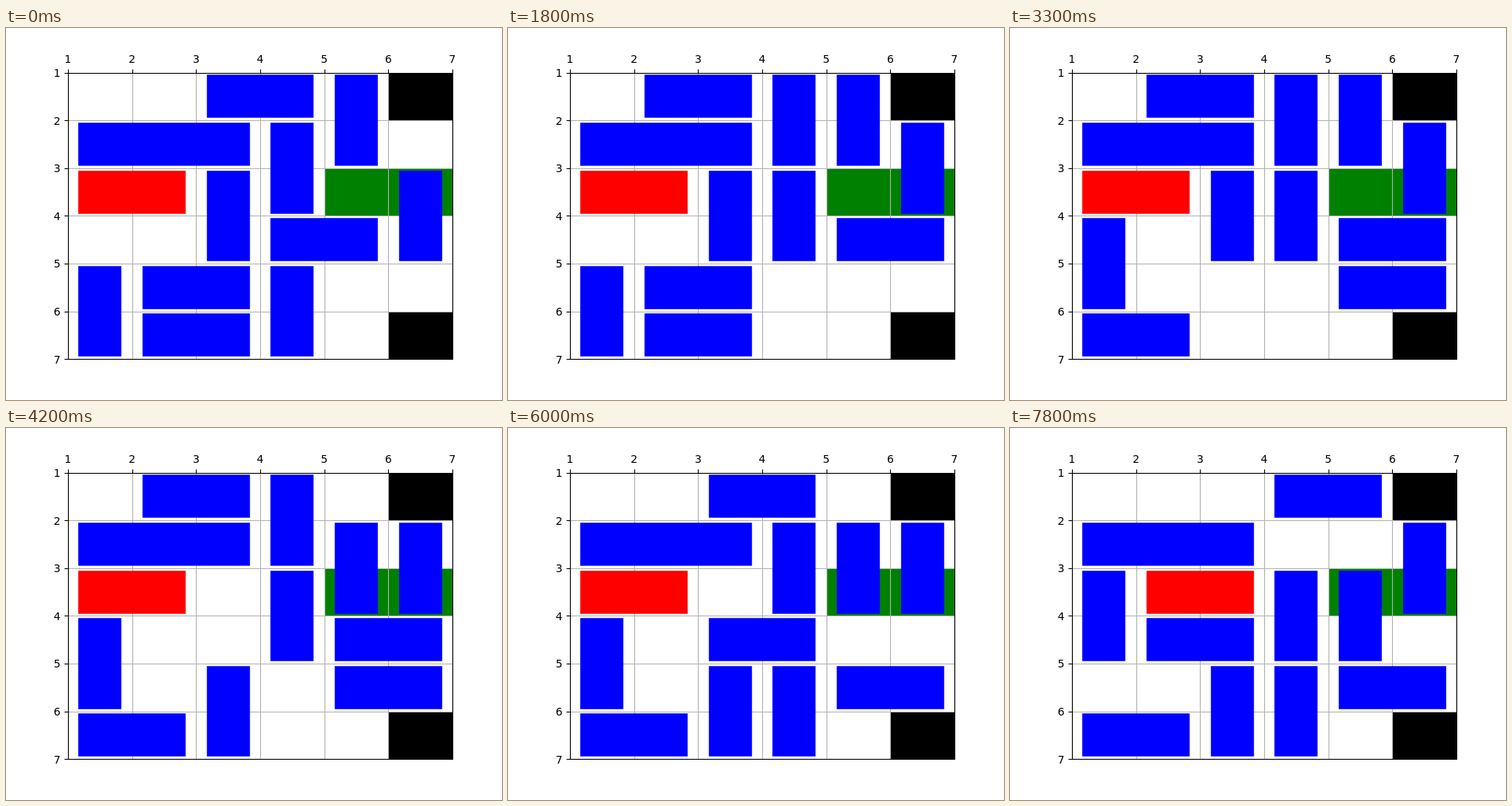
An HTML page with a canvas that plays this animation: 640 px wide and 480 px high, repeating every 8000 ms.

```html
<!DOCTYPE html>
<html lang="en">
<head>
<meta charset="utf-8">
<title>Sliding blocks</title>
<style>
html, body { margin: 0; height: 100%; overflow: hidden; background: #fff; }
canvas { display: block; }
</style>
</head>
<body>
<canvas id="stage" width="640" height="480"></canvas>
<script>
const ctx = document.getElementById("stage").getContext("2d");
const LOOP = 8000, STEP = 300;

// name: [column, row, columns, rows]
const START = {
  A: [3, 1, 2, 1], B: [5, 1, 1, 2], C: [1, 2, 3, 1], D: [4, 2, 1, 2],
  R: [1, 3, 2, 1], E: [3, 3, 1, 2], F: [6, 3, 1, 2], G: [4, 4, 2, 1],
  H: [1, 5, 1, 2], I: [2, 5, 2, 1], J: [2, 6, 2, 1], K: [4, 5, 1, 2]
};

// One-cell slides along each block's own axis; "-" is left or up
const MOVES = ("F- A- G+ D- K- K- H- J- I+ I+ I+ B+ E+ E+ " +
  "K+ K+ G- D+ G- A+ A+ R+ G- B+ H- D+").split(" ");

const xAt = c => 80 + (c - 1) * 496 / 6;
const yAt = r => 57.6 + (r - 1) * 61.6;
const snap = v => Math.floor(v + 0.5);

function stroke(color, width, x1, y1, x2, y2, cap = "butt") {
  ctx.strokeStyle = color;
  ctx.lineWidth = width;
  ctx.lineCap = cap;
  ctx.beginPath();
  ctx.moveTo(x1, y1);
  ctx.lineTo(x2, y2);
  ctx.stroke();
}

const thin = (color, ...ends) => stroke(color, 1.11, ...ends);

function fillCells(color, c, r, cols) {
  const x = snap(xAt(c)), y = snap(yAt(r));
  ctx.fillStyle = color;
  ctx.fillRect(x, y, snap(xAt(c + cols)) - x, snap(yAt(r + 1)) - y);
}

function drawBoard() {
  ctx.fillStyle = "#fff";
  ctx.fillRect(0, 0, 640, 480);
  fillCells("#000", 6, 1, 1);
  fillCells("#000", 6, 6, 1);
  fillCells("#008000", 5, 3, 2);
  for (let n = 1; n <= 7; n++) {
    const x = snap(xAt(n)) + 0.5, y = snap(yAt(n)) + 0.5;
    thin("#b0b0b0", x, 58, x, 427);
    thin("#b0b0b0", 80, y, 576, y);
  }
}

function drawBlock(name, [c, r, cols, rows]) {
  stroke(name === "R" ? "#f00" : "#00f", 55.56,
    snap(xAt(c + 0.5)), snap(yAt(r + 0.5)),
    snap(xAt(c + cols - 0.5)), snap(yAt(r + rows - 0.5)), "square");
}

function drawAxes() {
  ctx.strokeStyle = "#000";
  ctx.lineWidth = 1.11;
  ctx.strokeRect(80.5, 58.5, 496, 369);
  ctx.fillStyle = "#000";
  ctx.font = '13.89px "DejaVu Sans", sans-serif';
  for (let n = 1; n <= 7; n++) {
    const x = snap(xAt(n)) + 0.5, y = snap(yAt(n)) + 0.5;
    thin("#000", x, 53.5, x, 58.5);
    thin("#000", 75.5, y, 80.5, y);
    ctx.textAlign = "center";
    ctx.fillText(n, xAt(n), 45);
    ctx.textAlign = "right";
    ctx.fillText(n, 70.3, snap(yAt(n) + 5.3));
  }
}

function blocksAfter(count) {
  const blocks = {};
  for (const name in START) blocks[name] = [...START[name]];
  for (const [name, sign] of MOVES.slice(0, count)) {
    const block = blocks[name];
    const axis = block[2] > block[3] ? 0 : 1;
    block[axis] += sign === "+" ? 1 : -1;
  }
  return blocks;
}

function frame() {
  const blocks = blocksAfter(Math.floor(performance.now() % LOOP / STEP));
  drawBoard();
  for (const name in blocks) drawBlock(name, blocks[name]);
  drawAxes();
  requestAnimationFrame(frame);
}
frame();
</script>
</body>
</html>
```
